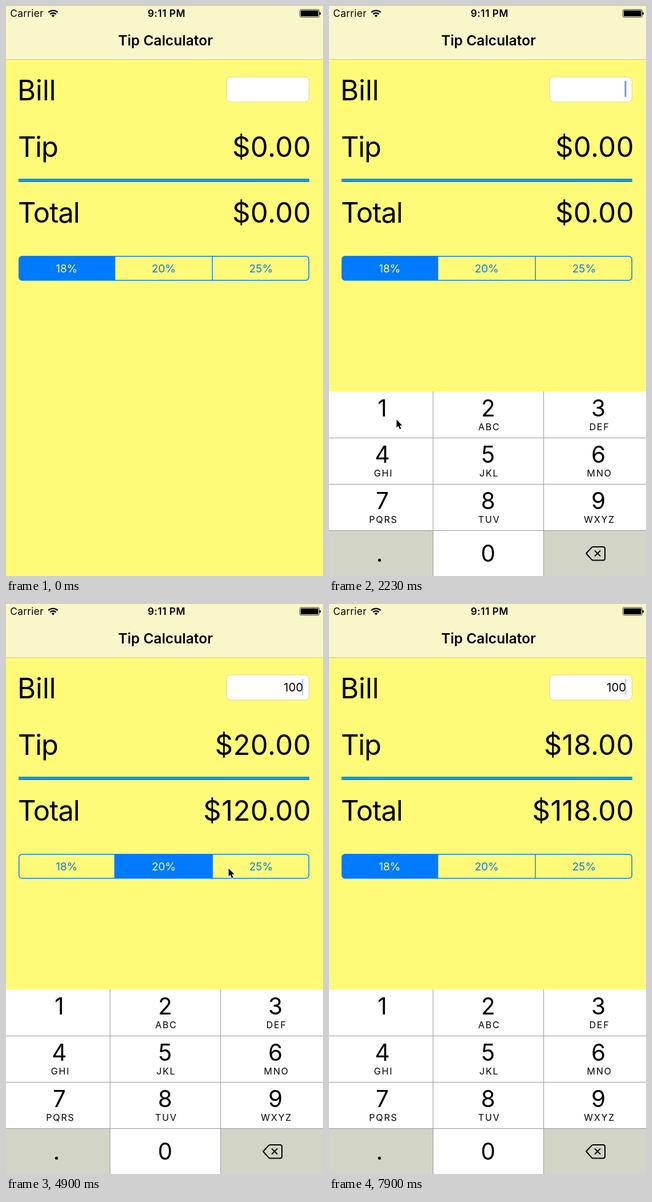
These frames come from a looping animation (556x997 px, 8 s). An HTML page:

```html
<!DOCTYPE html>
<html lang="en">
<head>
<meta charset="utf-8">
<title>Tip Calculator</title>
<style>
  html, body { margin: 0; width: 100%; height: 100%; overflow: hidden; background: #fffb78; }
  svg { display: block; width: 100%; height: 100%; font-family: Inter, Roboto, sans-serif; }
  .big { font-size: 49px; }
  .end { text-anchor: end; }
  .mid { text-anchor: middle; }
  .amount { text-anchor: end; letter-spacing: .5px; }
  .status { font-size: 17.3px; }
  .seg { font-size: 19px; text-anchor: middle; }
  .digit { font-size: 40.5px; text-anchor: middle; }
  .letters { font-size: 16.2px; letter-spacing: 1.7px; text-anchor: middle; }
</style>
</head>
<body>
<svg viewBox="0 0 556 997">
  <rect width="556" height="997" fill="#fffb78"/>
  <rect width="556" height="93" fill="#f9f7ca"/>
  <rect y="93" width="556" height="1.3" fill="#cfcda4"/>

  <text class="status" x="7.3" y="19" letter-spacing=".3">Carrier</text>
  <g fill="none" stroke="#000" stroke-width="2.4">
    <path d="M74.3 11.2a11.7 11.7 0 0 1 16.4 0M77.4 14.4a7.2 7.2 0 0 1 10.2 0"/>
    <path d="M82.5 19.6l-2.7-2.9a3.8 3.8 0 0 1 5.4 0z" fill="#000" stroke="none"/>
  </g>
  <text class="status mid" x="281.6" y="19" font-weight="600" letter-spacing=".5">9:11 PM</text>
  <rect x="515.5" y="6.2" width="33.8" height="13.4" rx="2" fill="none" stroke="#000" stroke-width=".8"/>
  <rect x="517" y="7.7" width="30.8" height="10.4" rx="1"/>
  <path d="M550 10.5q2.2 .5 2.2 2.5t-2.2 2.5z"/>
  <text class="mid" x="279.7" y="69" font-size="24.6" font-weight="600">Tip Calculator</text>

  <g class="big">
    <text x="20" y="164.7">Bill</text>
    <text x="21" y="264" letter-spacing="-1.3">Tip</text>
    <text x="21" y="379.2" letter-spacing="-1">Total</text>
    <text id="tip" class="amount" x="535.2" y="264"></text>
    <text id="total" class="amount" x="535.2" y="379.2"></text>
  </g>
  <rect x="22" y="302" width="510" height="6" fill="#0096ff"/>

  <rect x="387" y="124" width="144.5" height="44" rx="7" fill="#fff" stroke="#d6d39c"/>
  <text id="bill" class="end" x="521.3" y="153" font-size="20.5"></text>
  <rect id="caret" x="518.5" y="131" width="3" height="28" rx="1" fill="#426bf2"/>

  <clipPath id="pill"><rect x="22.7" y="437.5" width="508.6" height="42.5" rx="5.3"/></clipPath>
  <g id="segments" clip-path="url(#pill)"></g>
  <rect x="22.8" y="437.8" width="508.4" height="42" rx="5.3" fill="none" stroke="#007aff" stroke-width="1.5"/>

  <g id="keyboard"></g>
  <path id="cursor" d="M0 0V14L3.1 11L5.6 16.7L7.9 15.7L5.5 10.2H9.8Z"
    stroke="#fff" stroke-width="1.8" stroke-linejoin="round" paint-order="stroke"/>
</svg>
<script>
const $ = id => document.getElementById(id);

function add(parent, tag, attrs, text = '') {
  const el = document.createElementNS('http://www.w3.org/2000/svg', tag);
  for (const name in attrs) el.setAttribute(name, attrs[name]);
  el.textContent = text;
  parent.append(el);
  return el;
}

const BLUE = '#007aff', YELLOW = '#fffb78', GREY = '#d2d5c6';
const RATES = [18, 20, 25];

const segments = RATES.map((rate, i) => {
  const x = [22, 190, 361.2][i], end = [191.2, 362.5, 532][i];
  return {
    box: add($('segments'), 'rect', { x, y: 437, width: end - x, height: 44 }),
    label: add($('segments'), 'text', { class: 'seg', x: [106.3, 276.5, 447.3][i], y: 466 }, rate + '%')
  };
});
for (const x of [190, 361.2])
  add($('segments'), 'rect', { x, y: 437, width: 1.4, height: 44, fill: BLUE });

// Keyboard
const board = $('keyboard');
const edges = [0, 182, 376, 556], centers = [93.5, 279, 472.5];
const letters = ['', 'ABC', 'DEF', 'GHI', 'JKL', 'MNO', 'PQRS', 'TUV', 'WXYZ'];
const keys = {};
[...'123456789.0<'].forEach((name, i) => {
  const col = i % 3, row = Math.floor(i / 3), y = 674 + 81 * row;
  keys[name] = add(board, 'rect', {
    x: edges[col], y, width: edges[col + 1] - edges[col], height: 82,
    fill: '.<'.includes(name) ? GREY : '#fff'
  });
  if (name === '<') {
    add(board, 'path', {
      d: 'M451 957.5L460.5 947.3Q461.8 946 463.6 946H480.5Q484 946 484 949.5V966Q484 969.5 480.5 969.5H463.6Q461.8 969.5 460.5 968.2ZM466 952.5l10 10m0-10l-10 10',
      fill: 'none', stroke: '#000', 'stroke-width': 2, 'stroke-linejoin': 'round'
    });
    return;
  }
  const x = name === '.' ? 88.7 : centers[col];
  add(board, 'text', { class: 'digit', x, y: row < 3 ? y + 44 : y + 54.5 }, name);
  if (letters[i])
    add(board, 'text', { class: 'letters', x: centers[col] + 2, y: y + 68 }, letters[i]);
});
for (const x of edges.slice(1, 3))
  add(board, 'rect', { x, y: 674, width: 1, height: 323, fill: '#96989b' });
for (const y of [755, 836, 917])
  add(board, 'rect', { x: 0, y, width: 556, height: 1, fill: '#96989b' });

// Pointer stops: tick, x, y
const path = [
  [-3, 509, 142], [-2, 470, 142], [1, 470, 142], [4, 300, 420], [7, 118, 723], [9, 118, 723],
  [12, 309, 967], [15, 309, 967], [18, 300, 700], [21, 285, 460], [23, 290, 461],
  [25, 390, 462], [27, 447, 461], [28, 447, 461], [31, 290, 464], [32, 285, 465],
  [34, 173, 466], [35, 142, 466], [37, 142, 466], [41, 240, 779]
];

function pointerAt(tick) {
  const i = path.findIndex(p => p[0] >= tick);
  if (i < 1) return path[0].slice(1);
  const a = path[i - 1], b = path[i], u = (tick - a[0]) / (b[0] - a[0]);
  return [1, 2].map(n => a[n] + (b[n] - a[n]) * u);
}

const clamp = v => Math.max(0, Math.min(1, v));

function caretAlpha(time) {
  if (time < 1190) return 0;
  if (time >= 2370 && time < 3400) return 1;
  const phase = (time - (time < 2370 ? 960 : 3070)) % 1200;
  return phase < 550 ? clamp(phase / 90) : clamp((675 - phase) / 125);
}

function tickAt(t) {
  return t < 3400 ? Math.floor((t - 1180) / 148) : 15 + Math.floor((t - 3400) / 150);
}

let last;
function draw() {
  requestAnimationFrame(draw);
  const tick = tickAt(performance.now() % 8000);
  if (tick === last) return;
  last = tick;

  const bill = tick < 9 ? 0 : tick < 13 ? 1 : tick < 15 ? 10 : 100;
  const chosen = tick < 22 || tick >= 36 ? 0 : tick >= 27 && tick < 31 ? 2 : 1;
  const tip = bill * RATES[chosen] / 100;
  $('bill').textContent = bill || '';
  $('tip').textContent = '$' + tip.toFixed(2);
  $('total').textContent = '$' + (bill + tip).toFixed(2);

  segments.forEach(({ box, label }, i) => {
    box.setAttribute('fill', i === chosen ? BLUE : 'none');
    label.setAttribute('fill', i === chosen ? YELLOW : BLUE);
  });

  keys[1].setAttribute('fill', tick >= 8 && tick < 10 ? GREY : '#fff');
  keys[0].setAttribute('fill', tick >= 12 && tick < 16 ? GREY : '#fff');
  const drop = tick < 0 ? 330 : Math.round(307 * Math.exp(-1.7 * tick));
  board.setAttribute('transform', `translate(0 ${drop})`);

  const time = tick < 15 ? 1190 + 148 * tick : 3400 + 150 * (tick - 15);
  $('caret').setAttribute('opacity', caretAlpha(time));

  const shown = tick >= -3 && tick < 42;
  $('cursor').setAttribute('visibility', shown ? 'visible' : 'hidden');
  if (shown) $('cursor').setAttribute('transform', `translate(${pointerAt(tick).map(v => v + .5)})`);
}
draw();
</script>
</body>
</html>
```
